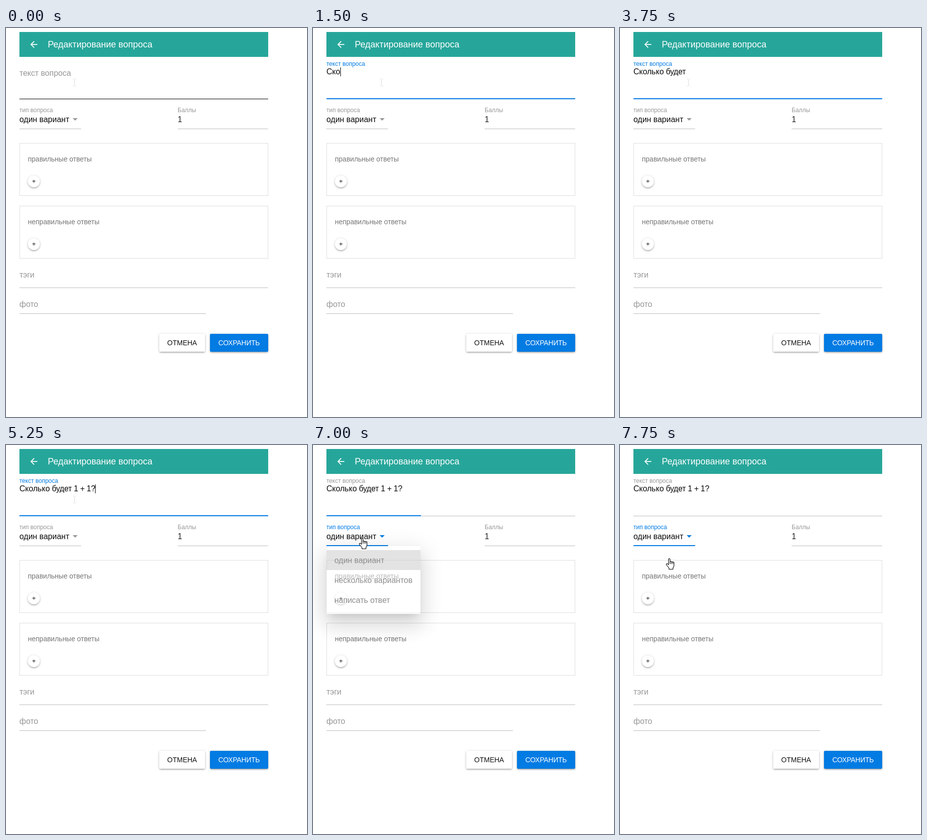
An HTML page for the animation above (8 s loop, 605 by 781 pixels).

```html
<!DOCTYPE html>
<html lang="ru">
<head>
<meta charset="utf-8">
<title>Редактирование вопроса</title>
<style>
  html, body { margin: 0; width: 100%; height: 100%; overflow: hidden; background: #fff; }
  svg { display: block; width: 605px; height: 781px; }
  text { font: 16px "Liberation Sans", Arial, sans-serif; white-space: pre; }
</style>
</head>
<body>
<svg id="stage" viewBox="0 0 605 781"></svg>
<script>
const TEAL = '#26a69a', BLUE = '#027be3', HINT = '#979797', LINE = '#bdbdbd', INK = '#0c0c0c';
const LOOP = 8000, STEP = 250;
const stage = document.getElementById('stage');

function add(tag, attrs, parent = stage) {
  const el = document.createElementNS('http://www.w3.org/2000/svg', tag);
  set(el, attrs);
  parent.appendChild(el);
  return el;
}
function set(el, attrs) {
  for (const key in attrs) el.setAttribute(key, attrs[key]);
}
function rect(x, y, width, height, fill, parent) {
  return add('rect', { x, y, width, height, fill }, parent);
}
function label(str, x, y, size, fill, parent, style = '') {
  const el = add('text', { x, y, fill, style: `font-size:${size}px;${style}` }, parent);
  el.textContent = str;
  return el;
}
// Each shadow layer: [offset y, blur, spread, opacity]
function raised(x, y, w, h, rx, fill, layers, parent) {
  for (const [dy, blur, grow, alpha] of layers) {
    set(rect(x - grow, y + dy - grow, w + 2 * grow, h + 2 * grow, '#000', parent),
      { rx, opacity: alpha, style: `filter:blur(${blur / 2}px)` });
  }
  set(rect(x, y, w, h, fill, parent), { rx });
}
const LOW = [[1, 5, 0, .2], [2, 2, 0, .14], [3, 1, -2, .12]];
const HIGH = [[11, 15, -7, .22], [24, 38, 3, .18], [9, 46, 8, .16]];

// Header
rect(27, 8, 500, 50, TEAL);
add('path', {
  d: 'M20 11H7.83l5.59-5.59L12 4l-8 8 8 8 1.41-1.41L7.83 13H20z',
  fill: '#fff', transform: 'translate(45.5 22.5) scale(.875)'
});
label('Редактирование вопроса', 84, 39, 18, '#fff');

// Question text field
const askLabel = label('текст вопроса', 27, 96, 16, HINT);
const askLine = rect(27, 142, 500, 1, LINE);
const askFocus = rect(27, 141, 500, 2, BLUE);
const typed = label('', 27, 93, 16, INK);
const firstWord = add('tspan', {}, typed);
const otherWords = add('tspan', { style: 'letter-spacing:-.3px' }, typed);
const caret = rect(0, 79, 1, 18, '#000');

// Type and points
const kindLabel = label('тип вопроса', 27, 169, 12, HINT);
label('один вариант', 27, 189, 16, INK);
const kindArrow = add('path', { d: 'M134 181h10l-5 5z', fill: HINT });
const kindLine = rect(27, 202, 124, 1, LINE);
label('Баллы', 345, 169, 12, HINT);
label('1', 345, 189, 16, '#212121');
rect(345, 202, 182, 1, LINE);

// Answer groups
function group(title, y) {
  set(rect(27.5, y + .5, 499, 105, 'none'), { stroke: '#dedede' });
  label(title, 44, y + 37, 14, '#757575');
  raised(44, y + 65, 24, 24, 12, '#fff', LOW);
  label('+', 56, y + 81, 13, '#111', stage, 'text-anchor:middle');
}
group('правильные ответы', 231);
group('неправильные ответы', 357);

// Tags, photo, buttons
label('тэги', 27, 501, 16, HINT);
rect(27, 521, 500, 1, LINE);
label('фото', 27, 560, 16, HINT);
rect(27, 573, 375, 1, LINE);
raised(308, 614, 92, 36, 2, '#fff', LOW);
label('ОТМЕНА', 354, 637, 14, '#111', stage, 'text-anchor:middle');
raised(410, 614, 117, 36, 2, BLUE, LOW);
label('СОХРАНИТЬ', 468.5, 637, 14, '#fff', stage, 'text-anchor:middle;letter-spacing:-.2px');

// Drop-down menu
const menu = add('g', {});
raised(27, 203, 189, 136, 2, '#fff', HIGH, menu);
rect(27, 211, 189, 40, '#c9c9c9', menu);
['один вариант', 'несколько вариантов', 'написать ответ'].forEach((item, i) =>
  label(item, 43, 237 + 40 * i, 16, '#212121', menu));

// Pointers
const beam = add('path', {
  d: 'M135 102.5h2M139 102.5h2M137.5 103v13M135 116.5h2M139 116.5h2', stroke: '#dcdcdc', fill: 'none'
});
const pen = { fill: '#fff', stroke: '#000', 'stroke-width': 1.1, 'stroke-linejoin': 'round' };
const arrow = add('path', { d: 'M0 0V16.5l4-3.7 2.7 6.2 2.5-1-2.7-6.2H12z', ...pen });
const hand = add('g', {});
add('path', {
  d: 'M5 13V2a1.5 1.5 0 0 1 3 0V7.5a1.4 1.4 0 0 1 2.8.3 1.4 1.4 0 0 1 2.7.5 1.3 1.3 0 0 1 2.5.8V14' +
     'Q16 17 14 19V22H6V19.5Q4 17 1 13.5 0 11 2 10.8 4 11 5 13Z', ...pen
}, hand);
add('path', { d: 'M8 7.5v4M10.8 8v3.5M13.5 8.5v3', stroke: '#000', fill: 'none' }, hand);

const QUESTION = 'Сколько будет 1 + 1?';
// [step, characters typed so far]
const KEYS = [[1, 0], [5, 1], [6, 3], [7, 4], [8, 6], [9, 7], [10, 9], [11, 10], [12, 12], [13, 14],
  [16, 16], [17, 18], [18, 19], [21, 20]];
const ARROW_PATH = { 24: [116, 222], 25: [106, 262], 26: [101, 226] };

function show(el, on) {
  el.setAttribute('visibility', on ? 'visible' : 'hidden');
}

function render(time) {
  const k = Math.floor(time % LOOP / STEP);
  const asking = k >= 1 && k < 28, choosing = k >= 28;

  const lift = Math.min(k / 2, 1);
  askLabel.style.fontSize = 16 - 4 * lift + 'px';
  set(askLabel, { y: 96 - 20 * lift, fill: asking ? BLUE : HINT });
  askLine.setAttribute('fill', k < 1 ? '#000' : LINE);
  const focusWidth = k === 1 ? 250 : k === 28 ? 190 : k === 29 ? 2 : asking ? 500 : 0;
  askFocus.setAttribute('width', focusWidth);

  const [lastKey, count] = KEYS.filter(key => key[0] <= k).pop() || [0, 0];
  const now = QUESTION.slice(0, count);
  firstWord.textContent = now.slice(0, 7);
  otherWords.textContent = now.slice(7);
  const width = count ? typed.getComputedTextLength() : 0;
  caret.setAttribute('x', Math.round(27 + width));
  show(caret, asking && ((k - lastKey) * STEP + 50) % 1060 < 530);

  kindLabel.setAttribute('fill', choosing ? BLUE : HINT);
  kindArrow.setAttribute('fill', choosing ? BLUE : HINT);
  set(kindLine, {
    y: choosing ? 201 : 202, height: choosing ? 2 : 1,
    fill: choosing ? BLUE : k === 27 ? '#000' : LINE
  });

  show(menu, k >= 28 && k < 31);
  menu.setAttribute('opacity', k === 28 ? .5 : 1);

  show(beam, k < 24);
  const spot = ARROW_PATH[k];
  show(arrow, spot);
  if (spot) arrow.setAttribute('transform', `translate(${spot})`);
  show(hand, k >= 27);
  hand.setAttribute('transform', `translate(92.5 ${k < 30 ? 186.5 : 227.5})`);
}

function tick() {
  render(performance.now());
  requestAnimationFrame(tick);
}
tick();
</script>
</body>
</html>
```
